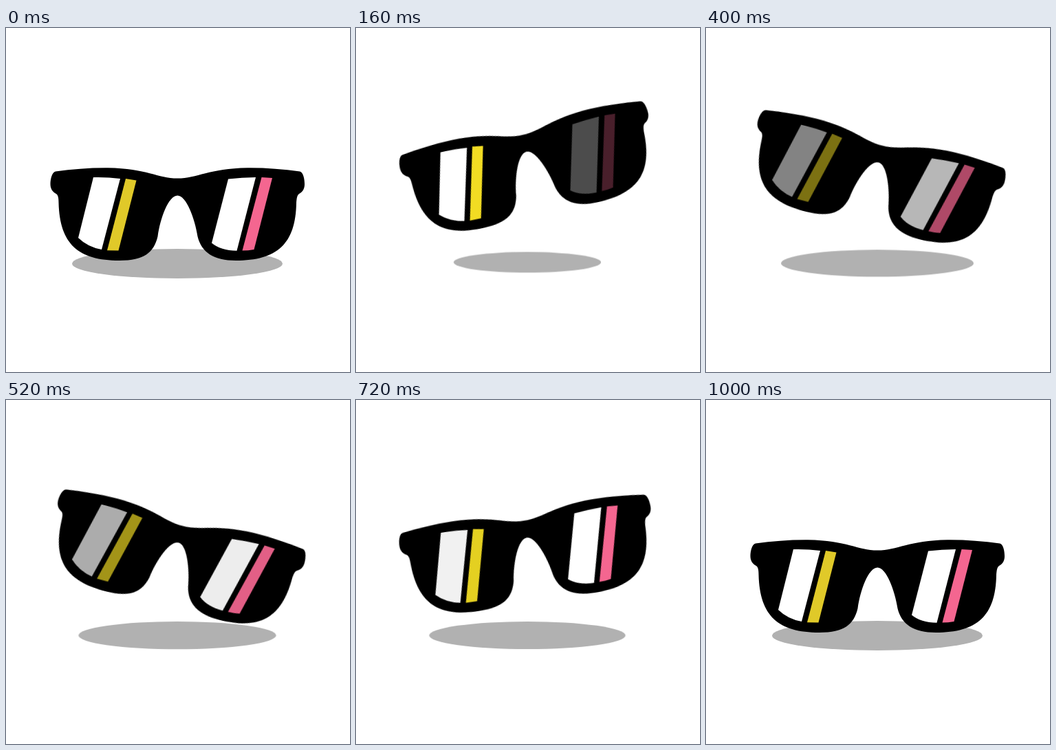
Animation, 500 px wide and 500 px high, one loop 1.08 s. Source, as an HTML page without scripts:

```html
<!DOCTYPE html>
<html lang="en">
<head>
<meta charset="utf-8">
<title>Hopping sunglasses</title>
<style>
  html, body { margin: 0; width: 100%; height: 100%; overflow: hidden; background: #fff; }
  svg { display: block; width: 100vw; height: 100vh; }

  /* 25 poses per second: each keyframe span is cut into 40 ms steps */
  .glasses, .shadow, .left, .right, .yellow {
    animation: 1080ms -2ms infinite step-end;
  }
  .glasses { animation-name: hop; transform-origin: 249px 250px; }
  .shadow { animation-name: shrink; transform-origin: 249px 336px; fill: #b1b1b1; }
  .left { animation-name: dim-left; }
  .right { animation-name: dim-right; }
  .yellow { animation-name: tint; fill: #f2dc23; }
  .white { fill: #fff; }
  .pink { fill: #f46690; }

  @keyframes hop {
    0% { transform: translateY(0) rotate(0deg); animation-timing-function: steps(2); }
    7.4074% { transform: translateY(-36px) rotate(-6.5deg); animation-timing-function: steps(2); }
    14.8148% { transform: translateY(-63.9px) rotate(-12.7deg); }
    18.5185% { transform: translateY(-67px) rotate(0deg); }
    22.2222% { transform: translateY(-63.7px) rotate(7.2deg); animation-timing-function: steps(2); }
    29.6296% { transform: translateY(-57px) rotate(11.7deg); animation-timing-function: steps(2); }
    37.037% { transform: translateY(-48.4px) rotate(13.7deg); animation-timing-function: steps(5); }
    55.5556% { transform: translateY(-28.5px) rotate(14.4deg); animation-timing-function: steps(2); }
    62.963% { transform: translateY(-53px) rotate(-12deg); animation-timing-function: steps(2); }
    70.3704% { transform: translateY(-34px) rotate(-6deg); animation-timing-function: steps(2); }
    77.7778% { transform: translateY(-9px) rotate(0deg); animation-timing-function: steps(4); }
    92.5926%, 100% { transform: translateY(0) rotate(0deg); }
  }
  @keyframes shrink {
    0% { transform: scale(1); animation-timing-function: steps(4); }
    14.8148% { transform: scale(.7); animation-timing-function: steps(2); }
    22.2222% { transform: scale(.83); animation-timing-function: steps(2); }
    29.6296% { transform: scale(.882); animation-timing-function: steps(2); }
    37.037% { transform: scale(.915); animation-timing-function: steps(5); }
    55.5556% { transform: scale(.954); animation-timing-function: steps(2); }
    62.963% { transform: scale(.91); animation-timing-function: steps(4); }
    77.7778%, 100% { transform: scale(1); }
  }
  @keyframes dim-left {
    0% { opacity: 1; }
    14.8148% { opacity: 1; animation-timing-function: steps(2); }
    22.2222% { opacity: .3; animation-timing-function: steps(13); }
    70.3704%, 100% { opacity: 1; }
  }
  @keyframes dim-right {
    0% { opacity: 1; }
    7.4074% { opacity: 1; animation-timing-function: steps(2); }
    14.8148% { opacity: .3; animation-timing-function: steps(10); }
    51.8519%, 100% { opacity: 1; }
  }
  @keyframes tint {
    0% { fill: #e0c929; }
    3.7037% { fill: #f2dc23; }
    55.5556% { fill: #c38746; }
    59.2593% { fill: #f2dc23; }
    92.5926%, 100% { fill: #e0c929; }
  }
</style>
</head>
<body>
<svg viewBox="0 0 500 500">
  <ellipse class="shadow" cx="249" cy="342.5" rx="153" ry="21.5"/>
  <g class="glasses">
    <path d="M72 208.5C97 205 122 203 148 203.2C205 204 220 218.5 249.3 218.5
      C278 218.5 295 204 351 203.2C377 203 402 205 427 208.5
      C432 209.5 434 219 434 227C434 234 431 238.5 426 241C423 243 422.5 248 422 254
      C421 314 394 338 334 338C302 338 284 326 278.5 303
      C274.500 277 262 243.5 249.3 243.5C236 243.5 224 277 220.5 303
      C215 326 201 338 165 338C105 338 78 314 76.5 254
      C76.5 248 76 243 73 241C68 238.5 64.5 234 64.5 227C64.5 219 67 209.5 72 208.5Z"/>
    <g class="left">
      <path class="white" d="M127 217Q147 216.5 166 219L139 322Q119 318.5 105 305Z"/>
      <path class="yellow" d="M174 219L189.5 221.5L163.5 323.5L147 323.2Z"/>
    </g>
    <g class="right">
      <path class="white" d="M323 219.5Q343 217 363 217L335.5 323.7Q312 323.5 299 312.5Z"/>
      <path class="pink" d="M371.5 217L387 218L360.5 322Q352 323.5 343.5 323.5Z"/>
    </g>
  </g>
</svg>
</body>
</html>
```
